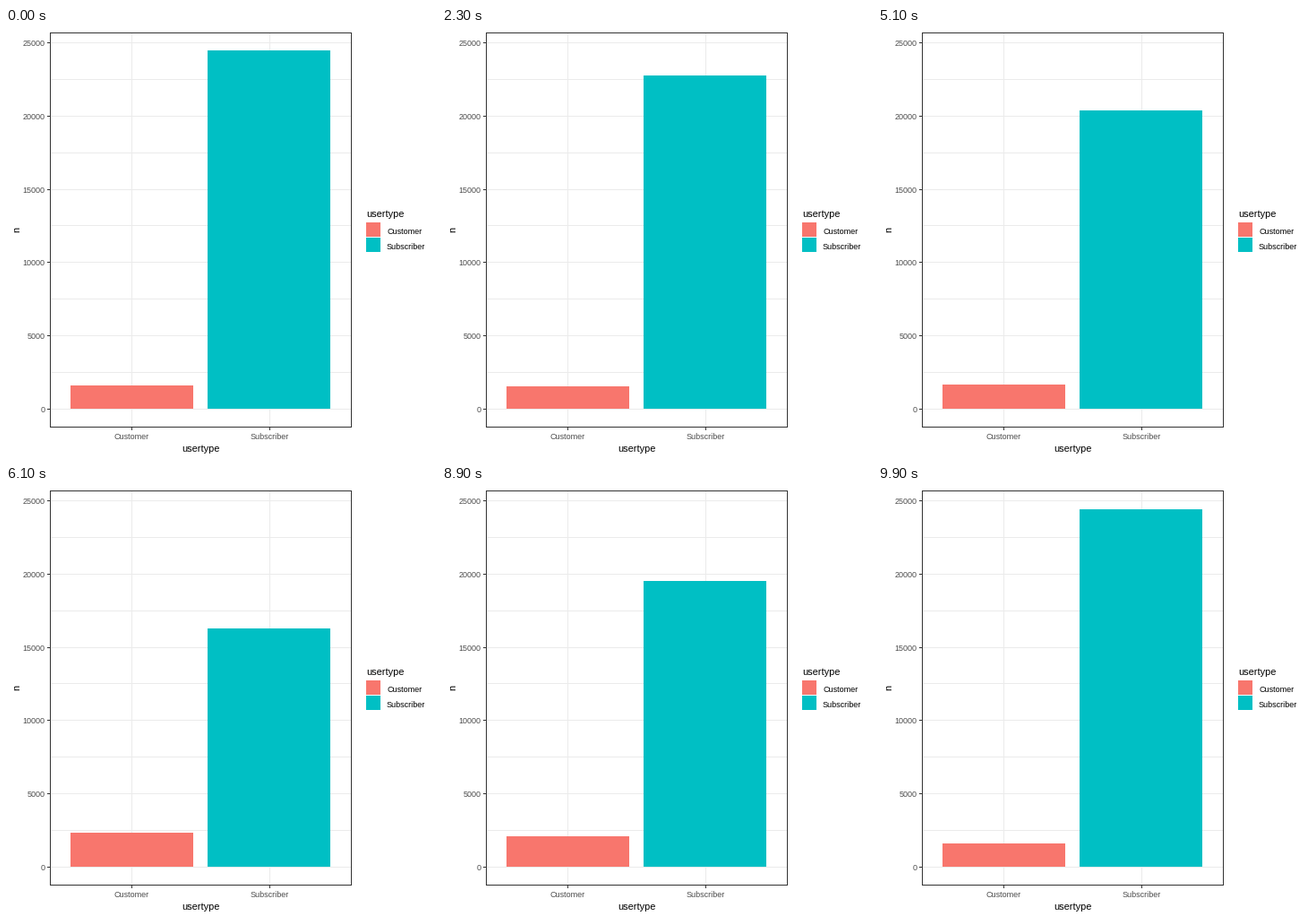
Write a matplotlib script that moves like this. It is 480 px wide and 480 px high and loops after 10000 ms.

```python
import math

import matplotlib.pyplot as plt
from matplotlib.animation import FuncAnimation
from matplotlib.patches import Rectangle

SIZE = 480
FRAMES = 100
BASE = 425                      # pixel row of n = 0
STEP = 81.8                     # pixels per 5000
RED, TEAL = "#F8766D", "#00BFC4"
GRID, DARK, GREY = "#EBEBEB", "#333333", "#4D4D4D"

# Tops of the two bars in each state, in pixels
STATES = [(399.75, 25.3), (401.4, 74.4), (384.5, 176.9)]
# First and last frame of the move from each state to the next
MOVES = [(11, 33), (45, 67), (79, 100)]

plt.rcParams["font.family"] = "Liberation Sans"
fig = plt.figure(figsize=(SIZE / 72, SIZE / 72), dpi=72, facecolor="white")
ax = fig.add_axes([0, 0, 1, 1])
ax.set_xlim(0, SIZE)
ax.set_ylim(SIZE, 0)
ax.axis("off")


def box(x, y, w, h, color, z=1):
    rect = Rectangle((x, y), w, h, facecolor=color, linewidth=0,
                     antialiased=False, zorder=z)
    return ax.add_patch(rect)


def label(x, y, text, size=9, color="black", ha="left", rotation=0):
    ax.text(x, y, text, fontsize=size, color=color, ha=ha, va="baseline",
            rotation=rotation, rotation_mode="anchor")


# Grid, ticks and axis labels
for i in range(6):
    y = round(BASE - i * STEP)
    box(50, y, 335, 1, GRID)
    box(46, y, 3, 1, DARK)
    label(43.5, y + 4, str(i * 5000), color=GREY, ha="right")
    if i < 5:
        box(50, round(BASE - (i + 0.5) * STEP), 335, 1, GRID)

for x, name in ((140, "Customer"), (294, "Subscriber")):
    box(x, 6, 1, 439, GRID)
    box(x, 446, 1, 3, DARK)
    label(x, 459, name, color=GREY, ha="center")

# Panel border
for y in (5, 445):
    box(49, y, 337, 1, DARK, z=3)
for x in (49, 385):
    box(x, 5, 1, 441, DARK, z=3)

label(217, 473, "usertype", size=11, ha="center")
label(15, 225, "n", size=11, ha="center", rotation=90)

# Legend
label(402, 211, "usertype", size=11)
for y, name, color in ((217, "Customer", RED), (234, "Subscriber", TEAL)):
    box(402, y, 16, 16, color)
    label(425, y + 13, name)

bars = [box(72, BASE - 1, 137, 1, RED, z=2),
        box(225, BASE - 1, 137, 1, TEAL, z=2)]


def tops(frame):
    """Bar tops at a frame: hold each state, then sine ease to the next."""
    for i, (start, end) in enumerate(MOVES):
        if frame <= end:
            t = max(0, (frame - start) / (end - start))
            p = (1 - math.cos(math.pi * t)) / 2
            target = STATES[(i + 1) % len(STATES)]
            return [a + (b - a) * p for a, b in zip(STATES[i], target)]


def update(frame):
    for bar, top in zip(bars, tops(frame)):
        y = math.floor(top)
        bar.set_y(y)
        bar.set_height(BASE - y)
    return bars


anim = FuncAnimation(fig, update, frames=FRAMES, interval=100,
                     repeat=True, repeat_delay=0, blit=False)
plt.show()
```
